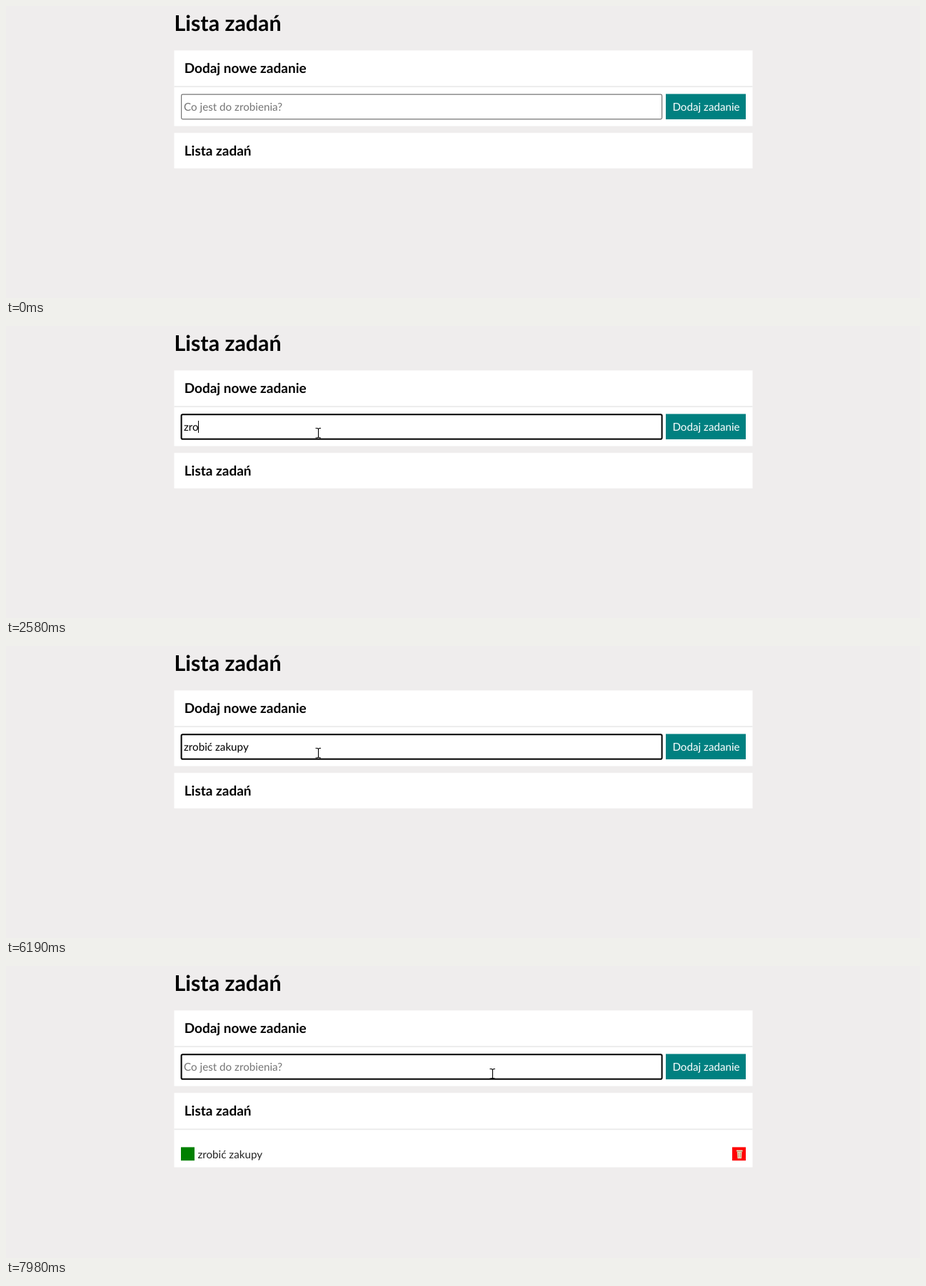
An HTML page for the animation above (8000 ms loop, 1280 by 410 pixels).

```html
<!DOCTYPE html>
<html lang="pl">
<head>
<meta charset="utf-8">
<title>Lista zadań</title>
<style>
  html, body { margin: 0; width: 100%; height: 100%; overflow: hidden; background: #efeded; }
  svg { display: block; width: 1280px; height: 410px; }
  text { font: 15.2px Lato, sans-serif; white-space: pre; text-rendering: geometricPrecision; }
  .title { font-size: 30.4px; font-weight: 700; }
  .head { font-size: 19px; font-weight: 700; }
  .panel { fill: #fff; }
  .rule { fill: #ebebeb; }
  #button { fill: #008080; }
  #button.hover { fill: #0bbcbc; }
  #field { fill: #fff; stroke: #767676; stroke-width: 1.2; }
  #field.hover { stroke: #3c3c3c; }
  #field.focus { stroke: #000; stroke-width: 2; }
  #hint { fill: #757575; }
  #click { fill: #ffe600; opacity: .5; }
  #arrow { fill: #fff; stroke: #000; stroke-linejoin: round; }
  #beam { fill: none; stroke: #000; stroke-width: 1.1; }
</style>
</head>
<body>
<svg viewBox="0 0 1280 410">
  <text class="title" x="235.5" y="35">Lista zadań</text>

  <rect class="panel" x="235.5" y="62.4" width="810" height="106.2"/>
  <rect class="rule" x="235.5" y="112.2" width="810" height="1.9"/>
  <text class="head" x="249.7" y="94">Dodaj nowe zadanie</text>
  <rect id="field" x="245.6" y="124.2" width="673" height="34.6" rx="1.8"/>
  <text id="hint" x="249" y="147">Co jest do zrobienia?</text>
  <text id="typed" x="249" y="147"></text>
  <rect id="caret" y="133" width="1" height="17"/>
  <rect id="button" x="924" y="123.5" width="112" height="35.6"/>
  <text x="933.4" y="147" fill="#fff">Dodaj zadanie</text>

  <rect class="panel" x="235.5" y="178.2" width="810" height="49.8"/>
  <text class="head" x="249.7" y="210">Lista zadań</text>
  <g id="task">
    <rect class="panel" x="235.5" y="228" width="810" height="54.6"/>
    <rect class="rule" x="235.5" y="228.3" width="810" height="1.9"/>
    <rect x="245" y="254.4" width="19" height="18.8" fill="#008000"/>
    <text x="268.4" y="269.7" fill="#222">zrobić zakupy</text>
    <rect x="1017" y="254.4" width="19" height="18.8" fill="#f00"/>
    <path d="M1023 258.5h8.5v2h-1l-.4 9.8h-5.6l-.5-9.8h-1z" fill="#e9dcc0"/>
    <path d="M1023 260.5h8.5M1026 262v7M1028.6 262v7" fill="none" stroke="#a8824f" stroke-width=".8"/>
  </g>

  <g id="pointer">
    <path id="arrow" d="M0 0V15.5L3.6 12.3L6 17.6L8.2 16.6L6 11.5H10.6Z"/>
    <path id="beam" d="M-3.5-6.5H-1L.5-5.5L2-6.5H4M.5-6V6.5M-3.5 7H-1L.5 6L2 7H4"/>
    <circle id="click" r="11.5"/>
  </g>
</svg>
<script>
const LOOP = 8000;
const TASK = 'zrobić zakupy';
const keyTimes = [1990, 2310, 2580, 2850, 3050, 3380, 3520, 3970, 4120, 4720, 5120, 5320, 5640];

// time, shape, hot spot
const path = [
  [180, 'arrow', 782, 270], [260, 'arrow', 703, 242],
  [530, 'arrow', 545, 165], [580, 'arrow', 431, 108],
  [780, 'beam', 434, 134], [855, 'beam', 436, 145], [930, 'beam', 437, 150],
  [6260, 'beam', 520, 136], [6320, 'arrow', 700, 165], [6390, 'arrow', 874, 185],
  [6590, 'arrow', 920, 172], [6650, 'arrow', 945, 158], [6710, 'arrow', 955, 155],
  [6860, 'arrow', 960, 150], [6930, 'arrow', 963, 147],
  [7460, 'arrow', 940, 154], [7540, 'arrow', 890, 160], [7620, 'arrow', 820, 160],
  [7700, 'arrow', 740, 160], [7780, 'arrow', 669, 160],
  [7930, 'beam', 676, 154], [7980, 'beam', 681, 151]
];

const el = id => document.getElementById(id);
const show = (id, on) => el(id).setAttribute('visibility', on ? 'visible' : 'hidden');
const within = (t, a, b) => t >= a && t < b;

function draw(t) {
  const added = t >= 7260;
  const focus = within(t, 1250, 7130) || added;
  const keys = keyTimes.filter(k => k <= t);
  const text = added ? '' : TASK.slice(0, keys.length);

  el('typed').textContent = text;
  show('hint', !text);
  show('task', added);
  el('field').setAttribute('class', focus ? 'focus' : within(t, 780, 1250) ? 'hover' : '');
  el('button').setAttribute('class', within(t, 6650, 7460) ? 'hover' : '');

  // The caret restarts its blink on every key press.
  const since = added ? 7260 : Math.max(1250, ...keys);
  show('caret', focus && Math.floor((t - since) / 525) % 2 === 0);
  const width = text ? el('typed').getComputedTextLength() : 0;
  el('caret').setAttribute('x', Math.floor(249.1 + width));

  const at = path.filter(p => p[0] <= t).pop();
  show('arrow', at && at[1] === 'arrow');
  show('beam', at && at[1] === 'beam');
  show('click', within(t, 1250, 1400) || within(t, 7130, 7260));
  if (at) el('pointer').setAttribute('transform', `translate(${at[2]} ${at[3]})`);
}

const start = performance.now();
function tick() {
  draw((performance.now() - start) % LOOP);
  requestAnimationFrame(tick);
}
tick();
</script>
</body>
</html>
```
